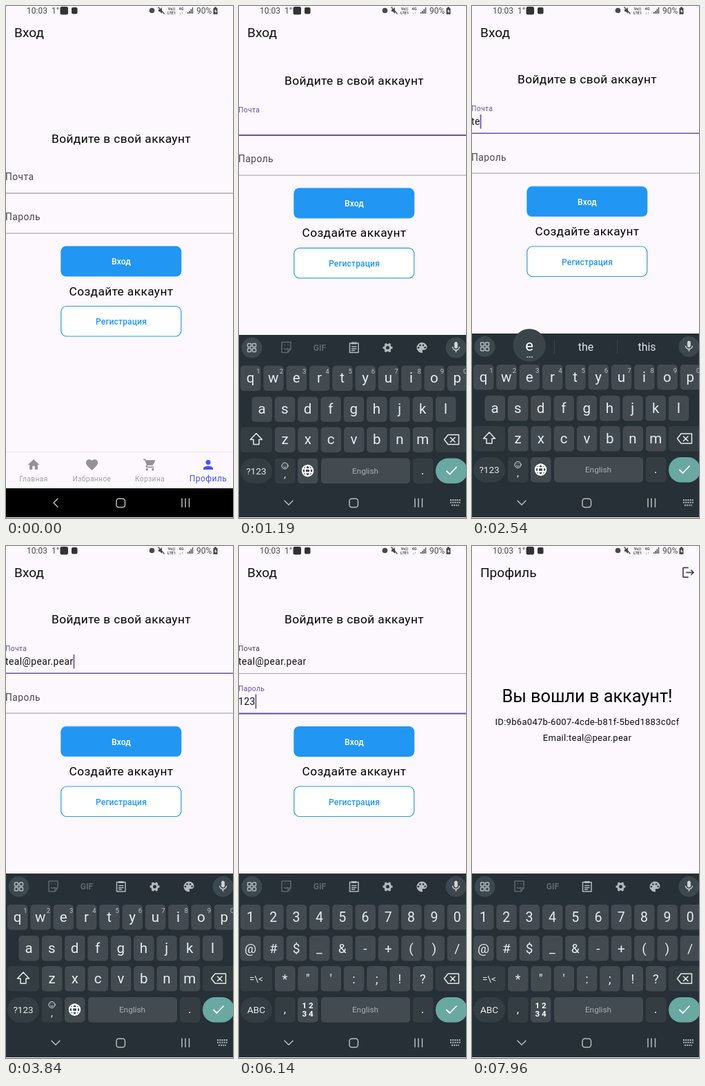
Animation, 329 px wide and 741 px high, one loop 8000 ms. Source, as an HTML page:

```html
<!DOCTYPE html>
<html lang="ru">
<head>
<meta charset="utf-8">
<title>Вход</title>
<style>
html, body { margin: 0; width: 100%; height: 100%; overflow: hidden; background: #fdf7fe; }
svg { display: block; width: 329px; height: 741px; font-family: Roboto, "Noto Sans", sans-serif; }
.mid { text-anchor: middle; }
.line { fill: none; stroke-width: 1.5; stroke-linecap: round; stroke-linejoin: round; }
.h2 { font-size: 17.3px; letter-spacing: .4px; fill: #000; }
.title { font-size: 19.1px; fill: #111; }
.info { font-size: 13px; letter-spacing: .3px; fill: #0c0b0e; }
.btn { font-size: 12.1px; font-weight: 500; letter-spacing: .1px; }
.input { font-size: 13.84px; letter-spacing: .43px; fill: #111; white-space: pre; }
.label { font-size: 13.84px; letter-spacing: .43px; fill: #49454f; }
.tab { font-size: 10.2px; letter-spacing: .4px; }

.kb, .form, .label, .rule, .letters, .symbols, .login, .profile, .back, .down, .ripple {
  animation: 8s linear infinite;
}
.kb { animation-name: kb; }
.form { animation-name: form; }
.mail .label { animation-name: mail-label; }
.pass .label { animation-name: pass-label; }
.mail .rule { animation-name: mail-rule; }
.pass .rule { animation-name: pass-rule; }
.letters, .symbols, .login, .profile { animation-timing-function: step-end; }
.letters { animation-name: letters; }
.symbols { animation-name: symbols; }
.login { animation-name: login; }
.profile { animation-name: profile; }
.back { animation-name: back; }
.down { animation-name: down; }
.ripple { animation-name: ripple; }

@keyframes kb {
  0%, 11% { transform: translateY(267px); animation-timing-function: cubic-bezier(.4, 0, .2, 1); }
  15.325%, 100% { transform: none; }
}
@keyframes form {
  0%, 12.4% { transform: none; animation-timing-function: cubic-bezier(.25, .5, .4, 1); }
  15.6%, 100% { transform: translateY(-86.5px); }
}
@keyframes mail-label {
  0%, 9.9% { transform: none; fill: #49454f; }
  12%, 51% { transform: translateY(-13.5px) scale(.75); fill: #6750a4; }
  53%, 100% { transform: translateY(-13.5px) scale(.75); fill: #49454f; }
}
@keyframes pass-label {
  0%, 51% { transform: none; fill: #49454f; }
  53%, 100% { transform: translateY(-13.5px) scale(.75); fill: #6750a4; }
}
@keyframes mail-rule {
  0%, 9.9% { stroke: #86828b; stroke-width: 1px; }
  12%, 51% { stroke: #6750a4; stroke-width: 1.8px; }
  53%, 100% { stroke: #a5a1aa; stroke-width: 1.2px; }
}
@keyframes pass-rule {
  0%, 51% { stroke: #9b97a0; stroke-width: 1.1px; }
  53%, 100% { stroke: #6750a4; stroke-width: 1.8px; }
}
@keyframes letters { 0% { visibility: visible; } 61.3%, 100% { visibility: hidden; } }
@keyframes symbols { 0% { visibility: hidden; } 61.3%, 100% { visibility: visible; } }
@keyframes login { 0% { visibility: visible; } 96.5%, 100% { visibility: hidden; } }
@keyframes profile { 0% { visibility: hidden; } 96.5%, 100% { visibility: visible; } }
@keyframes back { 0%, 10.9% { opacity: 1; } 11.8%, 100% { opacity: 0; } }
@keyframes down { 0%, 10.9% { opacity: 0; } 11.8%, 100% { opacity: 1; } }
@keyframes ripple { 0%, 91.9% { opacity: 0; } 93.2% { opacity: .14; } 96%, 100% { opacity: 0; } }
</style>
</head>
<body>
<svg viewBox="0 0 329 741">
  <rect width="329" height="741" fill="#fdf7fe"/>

  <g id="status" fill="#4a474f" font-size="12">
    <text x="30" y="11">10:03</text>
    <text x="66" y="11">1°</text>
    <rect x="78.500" y="1" width="11.500" height="11.500" rx="2.500" fill="#333"/>
    <rect x="95" y="2" width="8.500" height="9.500" rx="2" fill="#333"/>
    <circle cx="211.500" cy="6.500" r="3.800"/>
    <path d="M221 5h2l3-3v9l-3-3h-2z"/>
    <path class="line" d="M221 2l8 9" stroke="#4a474f"/>
    <g class="mid" font-size="5.500" font-weight="700">
      <text x="240" y="6">Vo))</text><text x="240" y="11.500">LTE1</text>
      <text x="254" y="6">4G</text><text x="254" y="11.500">↓↑</text>
    </g>
    <path d="M263 11v-2h1.500v2zm2.300 0V7h1.500v4zm2.300 0V4.500h1.500V11zm2.300 0V2h1.300v9z"/>
    <text x="276" y="11">90%</text>
    <path d="M300.500 3h1.500V1.500h3V3h1.500v9h-6z"/>
    <path d="M304 4.500l-2 3.500h1.500v2.500l2-3.500H304z" fill="#fdf7fe"/>
  </g>

  <g class="login">
    <text class="title" x="12" y="45">Вход</text>
    <g class="form">
      <text class="h2 mid" x="167" y="198">Войдите в свой аккаунт</text>
      <g class="mail">
        <g transform="translate(-1 252)"><text class="label">Почта</text></g>
        <path class="rule" d="M0 271H329"/>
        <text class="input" id="mail" x="-1" y="258.500"></text>
      </g>
      <g class="pass" transform="translate(0 58)">
        <g transform="translate(-1 252)"><text class="label">Пароль</text></g>
        <path class="rule" d="M0 271H329"/>
        <text class="input" id="pass" x="-1" y="258.500"></text>
      </g>
      <rect id="caret" width="1.700" height="21" fill="#6750a4"/>
      <rect x="79.300" y="347.500" width="175" height="44" rx="8" fill="#2196f3"/>
      <rect class="ripple" x="79.300" y="347.500" width="175" height="44" rx="8" fill="#fff"/>
      <text class="btn mid" x="167" y="374" fill="#fff">Вход</text>
      <text class="h2 mid" x="167" y="418.500">Создайте аккаунт</text>
      <rect x="79.800" y="434.500" width="174" height="43.500" rx="8" fill="#fff" stroke="#2a9ce4" stroke-width="1.200"/>
      <text class="btn mid" x="167" y="461" fill="#2196f3">Регистрация</text>
    </g>
  </g>

  <g class="profile">
    <text class="title" x="12" y="45">Профиль</text>
    <path transform="translate(303.300 28) scale(.86)" fill="#49454f" d="M17 7l-1.410 1.410L18.170 11H8v2h10.170l-2.580 2.580L17 17l5-5zM4 5h8V3H4c-1.100 0-2 .9-2 2v14c0 1.100.9 2 2 2h8v-2H4z"/>
    <text class="mid" x="167" y="226" font-size="25.300" fill="#000">Вы вошли в аккаунт!</text>
    <text class="info mid" x="167" y="259">ID:9b6a047b-6007-4cde-b81f-5bed1883c0cf</text>
    <text class="info mid" x="167" y="282">Email:teal@pear.pear</text>
  </g>

  <g id="tabs"><path d="M0 645.500H329" stroke="#ece7ee"/></g>
  <rect y="698" width="329" height="43" fill="#000"/>
  <g class="kb" id="kb"></g>

  <g class="line" stroke="#b9bcbe">
    <path class="back" d="M75 713l-6 6 6 6"/>
    <path class="down" d="M66 716l6 6 6-6"/>
    <rect x="160" y="713" width="12.500" height="12.500" rx="3.500"/>
    <path d="M255 713v12M260 713v12M265.500 713v12"/>
    <path class="down" d="M306 715h15M306 718.500h15M308 722.500h11" stroke-linecap="butt" stroke-width="2" stroke-dasharray="2 1.200"/>
  </g>
  <path d="M0 740.500H329" stroke="#eee"/>
</svg>

<script>
const $ = id => document.getElementById(id);
const PITCH = 33.3, KEY = '#434b51', DARK = '#333d42', INK = '#e8ebec', DIM = '#5d676d', ICON = '#b4babd';

const text = (x, y, s, size, fill = INK, extra = '') =>
  `<text class="mid" x="${x}" y="${y}" font-size="${size}" fill="${fill}" ${extra}>${s.replace('<', '&lt;')}</text>`;
const box = (x, y, w, fill, rx = 5) =>
  `<rect x="${x}" y="${y - 18}" width="${w}" height="36.500" rx="${rx}" fill="${fill}"/>`;
const icon = (x, y, scale, fill, d) =>
  `<path transform="translate(${x} ${y}) scale(${scale}) translate(-12 -12)" fill="${fill}" d="${d}"/>`;
const row = (chars, x, y, size = 20.5) => [...chars].map((c, i) =>
  box(x + i * PITCH - 14.5, y, 29.5, KEY) + text(x + i * PITCH, y + 6.5, c, size)).join('');

const MIC = 'M12 14c1.660 0 3-1.340 3-3V5c0-1.660-1.340-3-3-3S9 3.340 9 5v6c0 1.660 1.340 3 3 3zm5.300-3c0 3-2.540 5.100-5.300 5.100S6.700 14 6.700 11H5c0 3.410 2.720 6.230 6 6.720V21h2v-3.280c3.280-.48 6-3.300 6-6.720z';
const PALETTE = 'M12 3a9 9 0 0 0 0 18c.83 0 1.500-.67 1.500-1.500 0-.39-.15-.74-.39-1.010-.23-.26-.38-.61-.38-.99 0-.83.67-1.500 1.500-1.500H16c2.760 0 5-2.240 5-5 0-4.420-4.030-8-9-8z';
const HOME = 'M10 20v-6h4v6h5v-8h3L12 3 2 12h3v8z';
const HEART = 'M12 21.350l-1.450-1.320C5.400 15.360 2 12.280 2 8.500 2 5.420 4.420 3 7.500 3c1.740 0 3.410.81 4.500 2.090C13.090 3.810 14.760 3 16.500 3 19.580 3 22 5.420 22 8.500c0 3.780-3.400 6.860-8.550 11.540z';
const CART = 'M7 18a2 2 0 1 0 0 4 2 2 0 0 0 0-4zM1 2v2h2l3.600 7.590-1.350 2.450C4.520 15.370 5.480 17 7 17h12v-2H7.420a.25.25 0 0 1-.22-.37l.9-1.630h7.450c.75 0 1.410-.41 1.750-1.030l3.580-6.490A1 1 0 0 0 20 4H5.210l-.94-2zm16 16a2 2 0 1 0 0 4 2 2 0 0 0 0-4z';
const PERSON = 'M12 12a4 4 0 1 0 0-8 4 4 0 0 0 0 8zm0 2c-2.670 0-8 1.340-8 4v2h16v-2c0-2.660-5.330-4-8-4z';

$('tabs').innerHTML += [['Главная', 40, HOME], ['Избранное', 124.5, HEART], ['Корзина', 208.5, CART]]
  .map(([s, x, d]) => icon(x, 664, .85, '#949197', d) + `<text class="tab mid" x="${x}" y="688" fill="#a19ea4">${s}</text>`).join('')
  + icon(293, 664, .87, '#4355f0', PERSON)
  + '<text class="mid" x="293" y="687.500" font-size="12.100" letter-spacing=".43" fill="#4355f0">Профиль</text>';

const toolbar = `
  <g class="line" stroke="${DIM}"><path d="M62 485h13v10l-4 5h-9zM71 500v-5h4M65.500 494q2 3 4.500 0M66 489h.1M71 489h.1"/></g>
  ${text(117, 497, 'GIF', 12, DIM, 'font-weight="700"')}
  <g class="line" stroke="${ICON}">
    <path d="M160.500 486.500h12.500v13.500h-12.500zM163.500 491.500h6.500M163.500 494.500h6.500M163.500 497h4"/>
    <path d="M164 486.500h5.500" stroke-width="3"/>
  </g>
  <g fill="none" stroke="${ICON}">
    <circle cx="215.500" cy="493" r="4" stroke-width="3"/>
    <circle cx="215.500" cy="493" r="6" stroke-width="2" pathLength="12" stroke-dasharray="1" stroke-dashoffset=".5"/>
  </g>
  ${icon(265, 493, .83, ICON, PALETTE)}
  ${[[260, 493], [262.5, 489.5], [267, 489.5], [269.7, 492.8]].map(([x, y]) => `<circle cx="${x}" cy="${y}" r="1.300" fill="#263036"/>`).join('')}`;

const shared = `
  ${box(285, 626, 46, DARK)}
  <path class="line" stroke="${INK}" d="M303 619h15.500v14H303l-5.500-7zM306.500 623l6.500 6.500M313 623l-6.500 6.500"/>
  ${box(2, 626, 46, DARK)}${box(2, 671, 46, DARK, 18)}
  ${box(52, 671, 29.5, DARK)}${box(85, 671, 29.5, KEY)}
  ${box(119, 671, 129, KEY)}${text(183, 675, 'English', 11.8, '#a9afb2')}
  ${box(252, 671, 29.5, DARK)}${text(266, 676, '.', 18)}
  ${box(285, 671, 46, '#6aa8a2', 18)}
  <path class="line" d="M301 671.500l4.500 4.500 9.500-10" stroke="#fff" style="stroke-width:1.800"/>`;

const letters = row('qwertyuiop', 16.5, 537)
  + [...'1234567890'].map((c, i) => text(28 + i * PITCH, 530.5, c, 9.5, '#bcc1c4')).join('')
  + row('asdfghjkl', 33, 582) + row('zxcvbnm', 66.5, 626)
  + text(25, 676, '?123', 13.5) + text(66.5, 681, ',', 15)
  + `<g class="line" stroke="${INK}">
      <path d="M25 617l8.500 9h-4.500v7h-8v-7h-4.500z"/>
      <g style="stroke-width:1"><circle cx="66.500" cy="664" r="4.500"/><path d="M64.500 665.500q2 2 4 0M65 662.700h.1M68 662.700h.1"/></g>
      <g stroke="#fff" style="stroke-width:1.900"><circle cx="99.500" cy="671" r="7.800"/><ellipse cx="99.500" cy="671" rx="3.500" ry="7.800"/><path d="M92.500 668.300h14M92.500 673.700h14"/></g>
    </g>`;

const symbols = row('1234567890', 16.5, 537, 19.5) + row('@#$_&-+()/', 16.5, 582, 19)
  + row('*"\':;!?', 66.5, 626, 18.5)
  + text(25, 631, '=\\<', 13.5) + text(25, 676, 'ABC', 13.5) + text(66.5, 676, ',', 17)
  + text(99.5, 669, '1 2', 11.5, '#fff', 'font-weight="700"') + text(99.5, 681, '3 4', 11.5, '#fff', 'font-weight="700"');

$('kb').innerHTML = `
  <rect y="474" width="329" height="267" fill="#263036"/>
  <g id="toolbar">${toolbar}</g>
  <g id="strip">
    <path d="M119.500 483v20M210.500 483v20" stroke="#3c474d"/>
    ${[75, 165, 253.5].map(x => text(x, 498.5, '', 16, '#dfe3e5')).join('')}
  </g>
  <circle cx="18.500" cy="493" r="15" fill="#3d484e"/>
  <g class="line" stroke="${ICON}">${[13, 20].map(x => [487.5, 494.5].map(y => `<rect x="${x - .5}" y="${y - .5}" width="5" height="5" rx="1"/>`).join('')).join('')}</g>
  <circle cx="314.500" cy="493" r="15" fill="#3d484e"/>
  ${icon(314.5, 492.5, .8, '#d0d5d7', MIC)}
  ${shared}
  <g class="letters">${letters}</g>
  <g class="symbols">${symbols}</g>
  <g id="popup">
    <circle r="23.700" fill="#39454b"/>
    ${text(0, 8, '', 22, '#fff')}
    <path d="M-3.500 17h9" stroke="#dfe3e5" stroke-width="1.700" stroke-dasharray="1.700 1.500"/>
  </g>`;

// [time, text after the key press]
const MAIL = [[2280, 't'], [2500, 'te'], [2700, 'tea'], [2900, 'teal'], [3570, 'teal@pear.pear']];
const PASS = [[5450, '1'], [5700, '12'], [5960, '123'], [6300, '1234'], [6550, '12345'], [6800, '123456']];
const PASS_FOCUS = 4080, STRIP_END = 3570, HOLD = 100, LOOP = 8000;
const presses = [...MAIL.slice(0, 4), ...PASS].map(([at, s]) => [at, s.at(-1)]);
const typed = (steps, t) => steps.filter(([at]) => at <= t).at(-1) || [0, ''];
const put = (el, s) => { if (el.textContent !== s) el.textContent = s; };
const show = (el, on) => { el.style.display = on ? '' : 'none'; };
const slots = [...$('strip').querySelectorAll('text')];

function keySpot(c) {
  for (const [chars, x, y] of [['qwertyuiop', 16.5, 491], ['1234567890', 16.5, 491], ['asdfghjkl', 33, 536]]) {
    const i = chars.indexOf(c);
    if (i >= 0) return [Math.min(305, Math.max(24, x + i * PITCH)), y];
  }
}

function render(t) {
  const mail = typed(MAIL, t), pass = typed(PASS, t);
  put($('mail'), mail[1]);
  put($('pass'), pass[1]);

  const inPass = t >= PASS_FOCUS;
  const [since, value] = inPass ? pass : mail;
  const caret = $('caret');
  show(caret, value && (t - since) % 1000 < 500);
  caret.setAttribute('x', $(inPass ? 'pass' : 'mail').getComputedTextLength() - 1);
  caret.setAttribute('y', inPass ? 301 : 243);

  const suggesting = t >= MAIL[0][0] && t < STRIP_END;
  show($('strip'), suggesting);
  show($('toolbar'), !suggesting);
  const full = mail[1].length > 3;
  put(slots[0], mail[1]);
  put(slots[1], full ? MAIL.at(-1)[1] : 'the');
  slots[1].setAttribute('font-size', full ? 12 : 16);
  put(slots[2], full ? 'team' : 'this');

  const press = presses.find(([at]) => t >= at - 50 && t < at + HOLD);
  show($('popup'), press);
  if (press) {
    $('popup').setAttribute('transform', `translate(${keySpot(press[1])})`);
    put($('popup').querySelector('text'), press[1]);
  }
}

let start;
function tick(now) {
  start ??= now;
  render((now - start) % LOOP);
  requestAnimationFrame(tick);
}
render(0);
requestAnimationFrame(tick);
</script>
</body>
</html>
```
